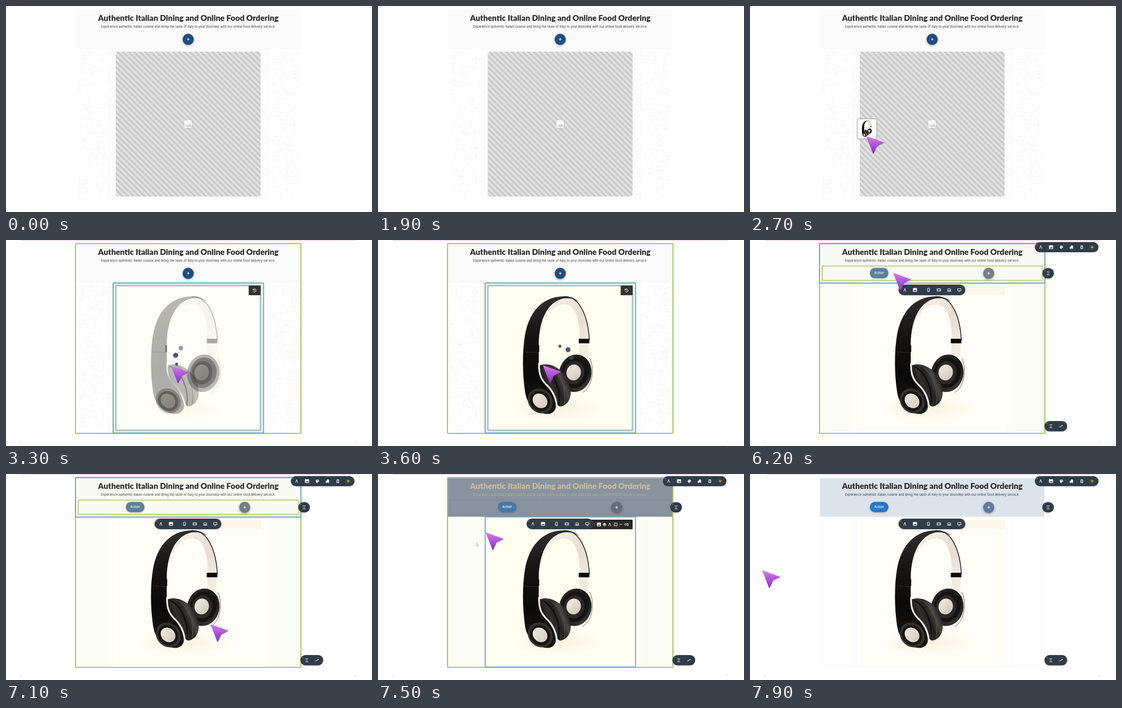
An HTML page with a canvas for the animation above (8 s loop, 690 by 388 pixels).

```html
<!DOCTYPE html>
<html lang="en">
<head>
<meta charset="utf-8">
<title>Page builder</title>
<style>
html, body { margin: 0; width: 100%; height: 100%; overflow: hidden; background: #fff; }
canvas { display: block; width: 690px; height: 388px; }
</style>
</head>
<body>
<canvas id="stage" width="690" height="388"></canvas>
<script>
const ctx = document.getElementById('stage').getContext('2d');
const LOOP = 8000, STEP = 100;
const GREEN = '#a4c65e', TEAL = '#68a6b4', LIME = '#c3d17c', SLATE = '#303c48';

// time, x, y of the pointer tip
const POINTER_PATH = [
  [1800, -60, 243], [2700, 219, 245], [3200, 311, 237], [3700, 311, 236],
  [4050, 316, 230], [4500, 340, 68], [5100, 337, 62], [5500, 337, 62],
  [6100, 270, 62], [6300, 270, 62], [7000, 391, 290], [7200, 380, 276],
  [7500, 203, 110], [7900, 23, 181.5]
];

const clamp = v => Math.max(0, Math.min(1, v));
const ramp = (t, a, b) => clamp((t - a) / (b - a));
const smooth = v => v * v * (3 - 2 * v);
const within = (t, a, b) => t >= a && t < b;

function mix(a, b, k) {
  const part = (c, i) => parseInt(c.slice(i, i + 2), 16);
  return 'rgb(' + [1, 3, 5].map(i => Math.round(part(a, i) + (part(b, i) - part(a, i)) * k)) + ')';
}

function rect(x, y, w, h, color, r = 0) {
  ctx.fillStyle = color;
  ctx.beginPath();
  ctx.roundRect(x, y, w, h, r);
  ctx.fill();
}

function frame(x, y, w, h, color, width = 2) {
  ctx.strokeStyle = color;
  ctx.lineWidth = width;
  ctx.beginPath();
  ctx.roundRect(x, y, w, h, 1.5);
  ctx.stroke();
}

function oval(x, y, rx, ry, color, turn = 0) {
  ctx.fillStyle = color;
  ctx.beginPath();
  ctx.ellipse(x, y, rx, ry, turn, 0, Math.PI * 2);
  ctx.fill();
}

function shape(d, color, stroke, width) {
  const path = new Path2D(d);
  if (color) { ctx.fillStyle = color; ctx.fill(path); }
  if (stroke) { ctx.strokeStyle = stroke; ctx.lineWidth = width; ctx.stroke(path); }
}

function gradient(x0, y0, x1, y1, ...colors) {
  const g = ctx.createLinearGradient(x0, y0, x1, y1);
  colors.forEach((c, i) => g.addColorStop(i / (colors.length - 1), c));
  return g;
}

function label(text, x, y, font, color) {
  ctx.font = font;
  ctx.fillStyle = color;
  ctx.textAlign = 'center';
  ctx.fillText(text, x, y);
}

function withShadow(color, blur, dy, draw) {
  ctx.save();
  ctx.shadowColor = color;
  ctx.shadowBlur = blur;
  ctx.shadowOffsetY = dy;
  draw();
  ctx.restore();
}

function squiggles() {
  let seed = 7;
  const rnd = () => (seed = (seed * 16807) % 2147483647) / 2147483647;
  ctx.strokeStyle = '#f8f8f8';
  ctx.lineWidth = 1.2;
  ctx.lineCap = 'round';
  ctx.beginPath();
  for (const left of [137, 499]) {
    for (let i = 0; i < 330; i++) {
      const x = left + rnd() * 51, y = 85 + rnd() * 276, a = rnd() * 6.28;
      ctx.moveTo(x, y);
      ctx.quadraticCurveTo(x + 4 * Math.cos(a), y + 4 * Math.sin(a),
        x + 5 * Math.cos(a + 1), y + 5 * Math.sin(a + 1));
    }
  }
  ctx.stroke();
  ctx.lineCap = 'butt';
}

function placeholder() {
  const x = 207, y = 86, size = 273, period = 10.5;
  ctx.save();
  ctx.beginPath();
  ctx.roundRect(x, y, size, size, 5);
  ctx.clip();
  rect(x, y, size, size, '#e7e7e7');
  ctx.fillStyle = '#cacaca';
  for (let d = 0; d < size * 2; d += period) {
    const left = x + d - size;
    ctx.beginPath();
    ctx.moveTo(left, y);
    ctx.lineTo(left + period / 2, y);
    ctx.lineTo(left + period / 2 + size, y + size);
    ctx.lineTo(left + size, y + size);
    ctx.fill();
  }
  ctx.restore();
  rect(336.5, 215.5, 13.5, 13.5, '#fff', 1.5);
  shape('M338.5 227 l3 -4 2 2.3 3 -3.8 3 5.5 z', '#c4c4c4');
}

function headphones() {
  // inner lining and right arm
  shape('M306 168 C314 138 332 108 358 108 C386 114 396 150 398 187 L396 222 L379 219 C382 180 381 148 368 130 C354 113 322 120 306 168 Z',
    gradient(330, 110, 398, 200, '#f6f0e6', '#e6dcd2', '#f3ece2'));
  shape('M350 106.5 C381 105 396 145 398.5 188', null, '#11100f', 1.4);
  shape('M378.5 186 L398.5 186 L398.5 194.5 L378.5 194.5 Z', '#0b0b0a');
  // right cup
  shape('M399 222 C410 245 403 278 386 287', null, '#5b5650', 0.9);
  oval(372, 251, 30.5, 35.5, gradient(345, 220, 400, 285, '#2b2927', '#171615', '#45423e'), 0.22);
  oval(372, 250, 25, 29, '#151413', 0.22);
  oval(370, 250, 19, 22, '#2c2a28', 0.22);
  oval(369, 249.5, 13.5, 15, gradient(356, 236, 380, 264, '#f3ece2', '#cfc6ba'), 0.25);
  // left cushion
  shape('M305 236 C322 230 346 240 357 262 C367 283 365 304 351 311 C344 316 338 314 337 305 C332 284 306 268 305 248 Z',
    gradient(312, 272, 356, 254, '#141312', '#32302d', '#22211f', '#4a4743', '#1c1b19'));
  shape('M318 236 C338 243 357 272 351 309', null, '#57534e', 1.2);
  shape('M309 238 C331 248 345 280 341 311', null, '#0d0c0b', 2);
  // band with outer cup
  shape('M277 284 C272 250 272 210 277 180 C284 139 307 106 352 106 C364 106 374 111 379 117 C370 110 360 109 350 110 C320 116 304 150 303 195 L303 245 C304 264 332 280 336 312 C334 327 322 330 310 326 C291 320 279 304 277 284 Z',
    gradient(310, 112, 300, 320, '#2e2c2a', '#151413', '#0a0a09', '#161513'));
  shape('M303.5 232 C303 256 309 265 321 276 C331 287 337 300 337 317', null, '#f7f2e8', 3.2);
  shape('M277 211 L303 212', null, '#48443e', 0.6);
  rect(300, 198, 4, 13, '#0c0b0a', 1);
  oval(306, 303, 25, 22, '#34312e', 0.75);
  oval(305.5, 303.5, 20, 18, '#171614', 0.75);
  oval(305.5, 303, 15, 12.5, gradient(293, 292, 316, 315, '#f1e9df', '#d6ccbf'), 0.75);
}

function product(t) {
  const cream = t < 4600 || within(t, 7300, 7700);
  rect(204, 83, 279, 279, '#fffefa');
  rect(207, 86, 273, 273, cream ? '#fffef1' : '#fffdf7');
  ctx.save();
  ctx.translate(338, 318);
  ctx.scale(1, 0.27);
  const glow = ctx.createRadialGradient(0, 0, 10, 0, 0, 88);
  glow.addColorStop(0, '#faf4e2');
  glow.addColorStop(1, '#faf4e200');
  ctx.fillStyle = glow;
  ctx.fillRect(-90, -90, 180, 180);
  ctx.restore();
  headphones();
}

function thumbnail(x, y) {
  rect(x, y, 37, 38, '#fbfbfb', 1);
  frame(x, y, 37, 38, '#8e8e8e', 0.9);
  ctx.save();
  ctx.translate(x + 9, y + 3);
  ctx.scale(0.145, 0.138);
  ctx.translate(-274, -105);
  headphones();
  ctx.restore();
}

function loader(t) {
  const turn = (t - 3600) / 900 * Math.PI * 2 - 1.53;
  [[2.8, '#4a586a'], [4.7, '#4a586a'], [4, '#4a586aa0']].forEach(([r, color], i) => {
    const a = turn + i * 0.74;
    oval(342 + 23 * Math.cos(a), 223 + 23 * Math.sin(a), r, r, color);
  });
}

// small white glyphs drawn around a centre
const icons = {
  caret: 'M-2 3 L0 -3 L2 3',
  phone: 'M-1.8 -3 H1.8 V3 H-1.8 Z M-0.6 2 H0.6',
  tablet: 'M-3.2 -2.2 H3.2 V2.2 H-3.2 Z M-2 -2 V2 M2 -2 V2',
  laptop: 'M-2.6 -2 H2.6 V1.4 H-2.6 Z M-3.8 2.6 H3.8',
  screen: 'M-3.2 -2.5 H3.2 V1.5 H-3.2 Z M-1.6 3 H1.6',
  bin: 'M-1.9 -1.5 H1.9 V3 H-1.9 Z M-2.5 -2.7 H2.5 M-1 0 L1 2 M1 0 L-1 2',
  rows: 'M-2.7 -2.8 H2.7 M-1.5 0 H1.5 M-2.7 2.8 H2.7',
  swap: 'M-3 1.2 H-0.2 L1 -1.2 H3 M2 -2.2 L3.2 -1.2 L2 -0.2',
  square: 'M-2.7 -2.7 H2.7 V2.7 H-2.7 Z',
  dash: 'M-2.6 0 H2.6',
  dots: 'M0 -2.4 V-1.2 M0 1.2 V2.4',
  link: 'M-0.5 -1.6 H-2 A1.6 1.6 0 0 0 -2 1.6 H-0.5 M0.5 -1.6 H2 A1.6 1.6 0 0 1 2 1.6 H0.5 M-1.4 0 H1.4 M2 1.8 L3.5 3',
  undo: 'M-2.6 -1.5 A3 3 0 1 1 -2.8 1.2 M-3.3 -2.8 L-2.7 -1 L-0.9 -1.5 M0 -1.6 V0.3 L1.3 1'
};

function icon(name, x, y) {
  ctx.save();
  ctx.translate(x, y);
  if (name === 'image') {
    rect(-3.8, -3.4, 7.6, 6.8, '#fff', 0.8);
    shape('M-2.8 2.2 L-1 -0.2 L0.3 1.2 L1.6 -0.8 L3 2.2 Z', SLATE);
  } else if (name === 'palette') {
    oval(0, 0, 3, 3, '#fff');
    [[-1.4, -0.3], [0, -1.4], [1.4, -0.3]].forEach(([a, b]) => oval(a, b, 0.6, 0.6, SLATE));
    oval(1.8, 2.1, 1.1, 0.8, SLATE);
  } else if (name === 'shapes') {
    oval(0.8, -0.8, 2.4, 2.4, '#fff');
    rect(-3.3, -0.3, 3.6, 3.2, '#fff', 0.4);
    rect(0.8, 0.8, 2.4, 2.2, '#fff', 0.4);
  } else if (name === 'layers') {
    shape('M0 -3.2 L3.3 -0.8 L0 1.6 L-3.3 -0.8 Z', '#fff');
    shape('M-3.3 0.8 L0 3.2 L3.3 0.8', null, '#fff', 1);
  } else if (name === 'sun') {
    oval(0, 0, 1.8, 1.8, '#f2a531');
    ctx.setLineDash([0.8, 1.3]);
    shape('M3 0 A3 3 0 1 1 -3 0 A3 3 0 1 1 3 0', null, '#f2a531', 1);
  } else {
    shape(icons[name], null, '#f4f5f6', 0.95);
  }
  ctx.restore();
}

function pill(x, y, w, h, items, mark = '#8fb6d8') {
  withShadow('#0002', 2, 0.5, () => rect(x, y, w, h, SLATE, h / 2));
  oval(x + 4.5, y + 4.5, 0.8, 0.8, mark);
  items.forEach(([name, ix]) => icon(name, ix, y + h / 2));
}

function toolbars() {
  pill(537, 4, 120, 19, [['caret', 548], ['image', 567.5], ['palette', 587],
    ['shapes', 606], ['bin', 625.5], ['sun', 645]]);
  pill(551, 53, 22, 19.5, [['rows', 562]]);
  pill(280, 84, 126, 20, [['caret', 292], ['image', 311], ['phone', 336.5],
    ['tablet', 356], ['laptop', 375.5], ['screen', 394.5]]);
  pill(555, 341, 43, 19.5, [['rows', 567], ['swap', 586]], '#b9c95f');
}

function imageToolbar() {
  rect(396, 86, 84, 18, '#292624', 1);
  [['dots', 408], ['image', 416.5], ['layers', 427], ['caret', 437], ['square', 448],
    ['dash', 458], ['link', 468.5]].forEach(([name, x]) => icon(name, x, 95));
}

function header(t) {
  const dark = smooth(ramp(t, 7200, 7500)), light = smooth(ramp(t, 7500, 7800));
  const base = within(t, 4600, 7300) ? '#fafaf4' : '#fafafa';
  const veil = dark * (1 - light);
  const fill = light > 0 ? mix('#88939f', '#dde3ea', light) : mix(base, '#88939f', dark);
  rect(132, 7.5, 423, 73, fill);
  if (veil > 0) {
    ctx.globalAlpha = veil;
    frame(136, 49, 415, 27, '#7e8a96', 1);
    ctx.globalAlpha = 1;
  }
  label('Authentic Italian Dining and Online Food Ordering', 343.7, 28,
    '900 15.05px Lato, sans-serif', mix('#2b2b2b', '#cbbd9f', veil));
  label('Experience authentic Italian cuisine and bring the taste of Italy to your doorstep with our online food delivery service.',
    343.5, 41, '5.96px Inter, sans-serif', mix('#3c3c3c', '#b5ad9f', veil));
}

function addButton(x, color) {
  withShadow('#0005', 4, 1.5, () => oval(x, 62.8, 10.5, 10.5, color));
  shape(`M${x - 2.5} 62.8 h5 m-2.5 -2.5 v5`, null, '#fff', 1);
}

function buttons(t) {
  if (t < 5400) {
    addButton(343.5, t < 4600 ? '#1f4d80' : '#40586b');
    return;
  }
  const k = ramp(t, 7200, 7500), end = ramp(t, 7500, 7800);
  const tone = (a, b, c) => end > 0 ? mix(b, c, end) : mix(a, b, k);
  withShadow('#0004', 3, 1, () =>
    rect(226, 52.5, 35, 19.5, tone('#5b809b', '#4778a8', '#2777c8'), 9.75));
  label('Action', 243.5, 64.3, '500 6px Inter, sans-serif', '#fff');
  addButton(450, tone('#747f85', '#626d79', '#5d7b9f'));
}

function outlines(t) {
  if (within(t, 3000, 7700)) frame(131, 6.8, 425, 357.4, GREEN);
  if (within(t, 3000, 4600)) {
    frame(204.5, 83.5, 278, 277.5, '#fff', 4);
    withShadow('#4c7f8c', 3, 0, () => frame(207, 85.7, 273, 273, '#8fb0b6', 1.2));
    frame(202, 81, 283.5, 282.5, TEAL);
  }
  if (within(t, 4600, 7300)) {
    frame(136, 49, 415.5, 27, LIME);
    frame(131, 6.8, 425, 74.4, TEAL);
  }
  if (within(t, 7300, 7700)) frame(202, 81, 283.5, 282.5, '#669fb9', 1.7);
}

function pointerAt(t) {
  const i = POINTER_PATH.findIndex(p => p[0] >= t);
  if (i < 1) return null;
  const [t0, x0, y0] = POINTER_PATH[i - 1], [t1, x1, y1] = POINTER_PATH[i];
  const k = smooth(ramp(t, t0, t1));
  return [x0 + (x1 - x0) * k, y0 + (y1 - y0) * k];
}

function pointer(x, y) {
  ctx.save();
  ctx.translate(x, y);
  ctx.lineJoin = 'round';
  const fill = gradient(12, 0, 14, 33, '#d67be6', '#b054da', '#8431c6');
  shape('M1 1 L32.5 12.5 L20 19 L13.5 32.5 Z', fill, fill, 1.6);
  ctx.restore();
}

function draw(t) {
  rect(0, 0, 690, 388, '#fff');
  const active = t >= 3000, tinted = within(t, 4600, 7700);
  rect(28, 0, 631, 1, active ? '#e2bce2' : '#f4f4f4');
  if (active) [28, 657].forEach(x => rect(x, 379, 2, 1, '#dcc6dc'));

  if (t < 4600) squiggles();
  else rect(131, 81, 425, 283, tinted ? '#fcfcf6' : '#fdfdfd');
  rect(191, 76, 306, 289, tinted ? '#fdfdf8' : '#fcfcfc');
  header(t);

  if (t < 3300) {
    withShadow('#0000000c', 8, 2, placeholder);
  } else {
    ctx.globalAlpha = ramp(t, 3200, 3500);
    product(t);
    ctx.globalAlpha = 1;
    if (t >= 4600) rect(396, 87, 84, 16, '#fdf6ea');
  }
  outlines(t);
  buttons(t);

  if (within(t, 3300, 4100)) {
    rect(457.5, 86, 22.5, 18, '#35312d', 1);
    icon('undo', 468.5, 95);
  }
  if (within(t, 4100, 4600) || within(t, 7300, 7700)) imageToolbar();
  if (t >= 5300) toolbars();

  const at = pointerAt(t);
  if (at) {
    if (t < 3300) thumbnail(at[0] - 17, at[1] - 32.5);
    pointer(...at);
  }
  if (within(t, 3300, 4100)) loader(t);
  if (within(t, 7400, 7600)) shape('M186 130 V136 L187.5 134.8 L188.5 136.5 L189 134 Z', '#fff', '#777', 0.6);
}

const start = performance.now();
function tick(now) {
  const t = Math.max(0, now - start) % LOOP;
  draw(Math.floor(t / STEP) * STEP);
  requestAnimationFrame(tick);
}
draw(0);
requestAnimationFrame(tick);
</script>
</body>
</html>
```
